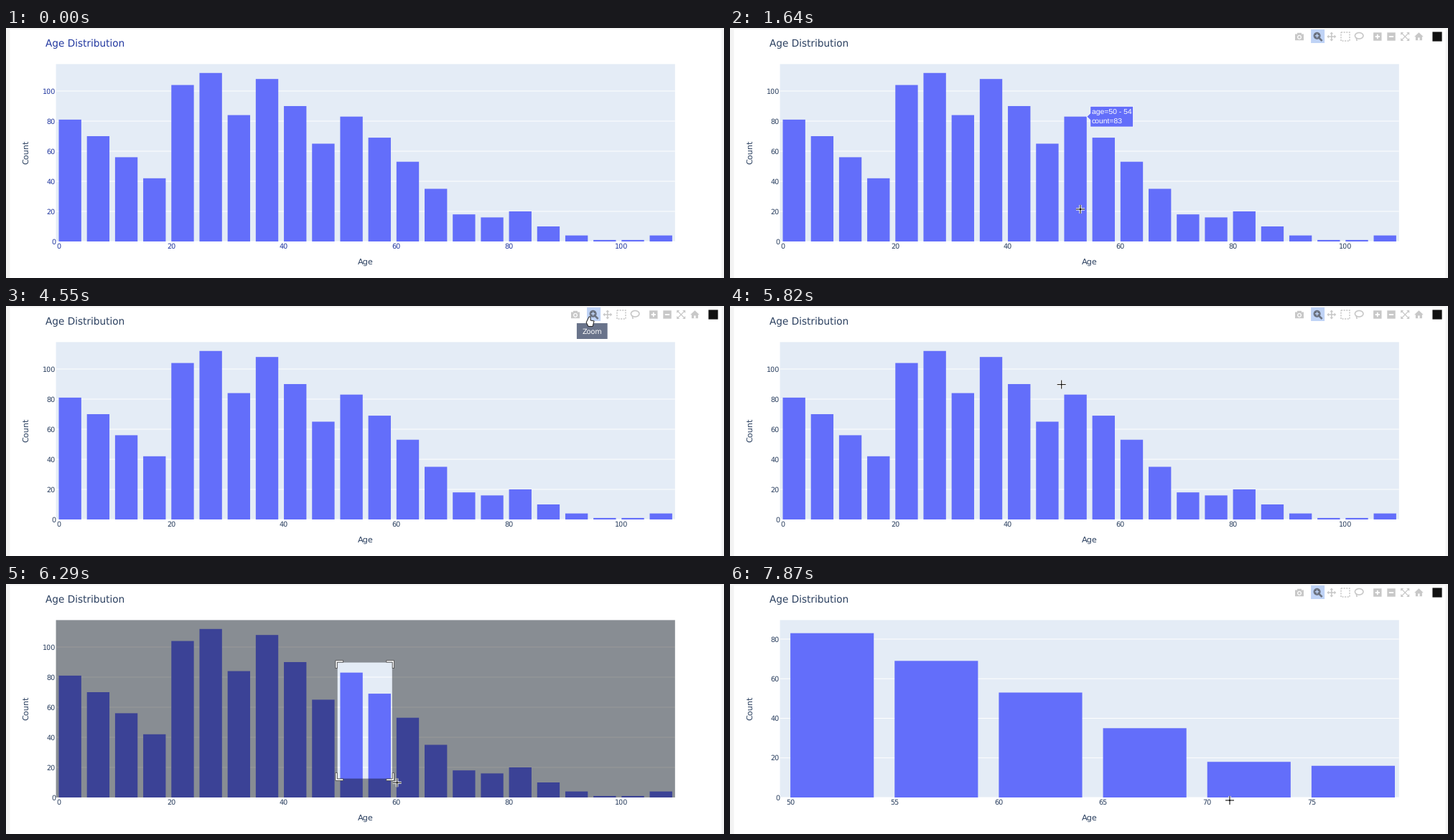
These frames come from a looping animation (1000x349 px, 8000 ms). A matplotlib script:

```python
import numpy as np
import matplotlib.pyplot as plt
from matplotlib.animation import FuncAnimation
from matplotlib.lines import Line2D
from matplotlib.patches import Circle, Ellipse, PathPatch, Polygon, Rectangle
from matplotlib.path import Path

W, H, DPI = 1000, 349, 100
LOOP, STEP = 8000, 40
LEFT, RIGHT, TOP, BOTTOM = 69.6, 931.8, 50.4, 298
COUNTS = [81, 70, 56, 42, 104, 112, 84, 108, 90, 65, 83,
          69, 53, 35, 18, 16, 20, 10, 4, 1, 1, 4]
FULL = (-0.5, 109.5, max(COUNTS) / 0.95)     # x from, x to, y top
ZOOM = (49.5, 79.2, 89.6)
BAR, PAPER, INK, FIRST_INK = "#636efa", "#e4ecf6", "#2a3f5f", "#2238a0"
GREY, ACTIVE, GLOW = "#c8c8c8", "#6b7280", "#bfd3f6"
START, END = np.array([461.7, 109.6]), np.array([696, 302])
SHOW, DRAG, DROP, RELEASE = 180, 5900, 7030, 7350

plt.rcParams["font.family"] = "DejaVu Sans"
plt.rcParams["text.hinting"] = "none"
plt.rcParams["path.snap"] = False
fig = plt.figure(figsize=(W / DPI, H / DPI), dpi=DPI, facecolor="#f3f3f3")
ax = fig.add_axes([0, 0, 1, 1])
ax.set(xlim=(0, W), ylim=(H, 0))
ax.axis("off")


def pt(px):
    return px * 72 / DPI


def put(artist, z):
    artist.set_zorder(z)
    ax.add_artist(artist)
    return artist


def box(x0, y0, x1, y1, color, z):
    return put(Rectangle((x0, y0), x1 - x0, y1 - y0, fc=color, ec="none"), z)


def square(cx, cy, half, color, z):
    return box(cx - half, cy - half, cx + half, cy + half, color, z)


def line(xs, ys, color, width, z, **kw):
    return put(Line2D(xs, ys, color=color, lw=pt(width),
                      solid_capstyle="butt", **kw), z)


def plus(cx, cy, r, color, width, z):
    return line([cx - r, cx + r, np.nan, cx, cx], [cy, cy, np.nan, cy - r, cy + r],
                color, width, z)


def shape(points, color, z, edge="none", width=0):
    return put(Polygon(points, closed=True, fc=color, ec=edge, lw=pt(width)), z)


def label(x, y, s, size, color=INK, z=6, **kw):
    return ax.text(x, y, s, fontsize=pt(size), color=color, zorder=z, **kw)


def show(parts, on):
    for p in parts:
        p.set_visible(bool(on))


# ---- chart -------------------------------------------------------------
def to_px(view, x, y):
    lo, hi, top = view
    return (LEFT + (x - lo) / (hi - lo) * (RIGHT - LEFT),
            BOTTOM - y / top * (BOTTOM - TOP))


def make_view(view, xticks, yticks):
    parts, ticks = [], []
    for v in yticks:
        y = to_px(view, 0, v)[1]
        parts.append(line([LEFT, RIGHT], [y, y], "white", 1, 2))
        ticks.append(label(69, y + 3.5, str(v), 9.6, ha="right"))
    for v in xticks:
        ticks.append(label(to_px(view, v, 0)[0], 308, str(v), 9.6, ha="center"))
    for k, n in enumerate(COUNTS):
        if view[0] < 5 * k and 5 * k + 4 < view[1]:
            parts.append(box(*to_px(view, 5 * k, n), *to_px(view, 5 * k + 4, 0), BAR, 3))
    return parts + ticks, ticks


box(5.5, 2, 996.5, H, "white", 0)
box(LEFT, TOP, RIGHT, BOTTOM, PAPER, 1)
full, full_ticks = make_view(FULL, range(0, 101, 20), range(0, 101, 20))
zoomed, _ = make_view(ZOOM, range(50, 76, 5), range(0, 81, 20))
title = label(55, 26, "Age Distribution", 13.6)
label(501, 330, "Age", 11.2, ha="center")
label(28, 173.5, "Count", 11.2, ha="center", va="center", rotation=90)


# ---- toolbar -------------------------------------------------------------
CY = 12


def button_x(slot, group):
    return 793 + 19.2 * slot + 6.4 * group


CAMERA, BADGE = button_x(0, 0), button_x(9, 3)
LOUPE, PAN, SELECT, LASSO = (button_x(k, 1) for k in range(1, 5))
PLUS, MINUS, FIT, HOME = (button_x(k, 2) for k in range(5, 9))


def pan_icon(color, z):
    parts = [plus(PAN, CY, 5, color, 1.5, z)]
    for a in np.arange(4) * np.pi / 2:
        u = np.array([np.cos(a), np.sin(a)])
        v = np.array([-u[1], u[0]])
        c = u * 3.7 + (PAN, CY)
        parts.append(shape([c + 2.8 * u, c + 2.5 * v, c - 2.5 * v], color, z))
    return parts


def make_toolbar():
    parts = [
        box(CAMERA - 6, 8.5, CAMERA + 6, 17.2, GREY, 7),
        box(CAMERA - 3, 6.8, CAMERA + 3, 9, GREY, 7),
        put(Circle((CAMERA, 12.8), 3, fc="white"), 8),
        put(Circle((CAMERA, 12.8), 1.7, fc=GREY), 9),
        square(LOUPE, 11.5, 9.5, GLOW, 7),
        line([LOUPE, LOUPE + 6], [12, 18], ACTIVE, 2.6, 8),
        put(Circle((LOUPE - 1, 10.8), 5, fc=ACTIVE), 8),
        plus(LOUPE - 1, 10.8, 2.7, GLOW, 1.3, 9),
        put(Rectangle((SELECT - 6, CY - 6), 12, 12, fc="none", ec=GREY,
                      lw=pt(1.5), ls=(0, (1.4, 1))), 8),
        put(Ellipse((LASSO, 10.8), 11.5, 8.5, fc="none", ec=GREY, lw=pt(1.6)), 8),
        line([LASSO - 4, LASSO - 3], [13.5, 18], GREY, 1.6, 8),
        square(PLUS, CY, 5.7, GREY, 8), plus(PLUS, CY, 3.2, "white", 1.8, 9),
        square(MINUS, CY, 5.7, GREY, 8),
        line([MINUS - 3.2, MINUS + 3.2], [CY, CY], "white", 1.8, 9),
        shape([(HOME, 6.2), (HOME + 6.3, 12.2), (HOME - 6.3, 12.2)], GREY, 8),
        box(HOME - 4.5, 11.5, HOME + 4.5, 17.2, GREY, 8),
        box(HOME - 1.2, 13.4, HOME + 1.2, 17.2, "white", 9),
        square(BADGE, CY, 6.6, "#111111", 8),
    ]
    for sx in (-1, 1):
        for sy in (-1, 1):
            c, d = np.array([FIT, CY]), np.array([sx, sy])
            parts.append(line(*zip(c, c + 5 * d), GREY, 1.2, 8))
            parts.append(shape([c + 6 * d, c + d * (2, 6), c + d * (6, 2)], GREY, 8))
    return parts + pan_icon(GREY, 8)


toolbar = make_toolbar()
pan_dark = pan_icon("#777777", 9)
tip_text = label(0, 38.5, "", 9.6, "white", 15, ha="center")
tip_box = box(0, 24, 1, 46, "#69738a", 14)
tip = [tip_text, tip_box]

# ---- hover label, selection and pointers -----------------------------------
hover_box = shape([(0, 0)] * 3, BAR, 12, "white", 0.8)
hover_rows = [label(0, 0, "", 10.4, "white", 13, family="Liberation Sans")
              for _ in range(2)]
hover = [hover_box, *hover_rows]

shade = put(PathPatch(Path([(0, 0)]), fc="black", ec="none"), 10)
handles = put(PathPatch(Path([(0, 0)]), fc="white", ec="#444444", lw=pt(0.8)), 11)

cross = [line([], [], "white", 3.2, 19), line([], [], "#111111", 1.1, 20)]
HAND = np.array([(-1, 0), (1, 0), (1, 5), (6, 6), (4, 13.5), (-2, 13.5), (-5, 8)])
ARROW = np.array([(0, 0), (0, 12), (8.4, 8.6)])
hand = shape(HAND, "white", 20, "#222222", 1)
arrow = shape(ARROW, "#111111", 20, "white", 0.8)

# leave, arrive, place
MOVES = [(SHOW, 930, (285, 225)), (1060, 1640, (488, 253)),
         (2210, 2700, (PAN - 1.5, 13.5)), (3270, 3580, (LOUPE, 13.5)),
         (4440, 5800, START)]


def pointer(t):
    if t > DRAG:
        # sideways evenly, downwards fast at first
        s = min((t - DRAG) / (DROP - DRAG), 1)
        return START + (END - START) * (s, 1 - (1 - s) ** 4.7)
    pos = np.array([120, H])
    for leave, arrive, place in MOVES:
        s = np.clip((t - leave) / (arrive - leave), 0, 1)
        pos = pos + (np.array(place) - pos) * s * s * (3 - 2 * s)
    return pos


def rect(x0, y0, x1, y1):
    return [(x0, y0), (x1, y0), (x1, y1), (x0, y1)]


def joined(polys):
    return Path.make_compound_path(*[Path([*p, p[0]], closed=True) for p in polys])


def corner(cx, cy, sx, sy, near=0.4, far=2.8, arm=8):
    ell = [(far, -arm), (near, -arm), (near, near), (-arm, near), (-arm, far), (far, far)]
    return [(cx + sx * u, cy + sy * v) for u, v in ell]


def set_selection(t):
    on = DRAG < t < RELEASE
    show([shade, handles], on)
    if not on:
        return
    x0, y0 = START
    x1, y1 = np.clip(pointer(t - 33), START, (RIGHT, BOTTOM))
    if x1 - x0 < min(max(0.6 * (y1 - y0), 8), 16):
        marks = [rect(x0 - 16, y + s * 0.4, x0 + 16, y + s * 2.8)
                 for y, s in ((y0, -1), (y1, 1))]
        x0, x1 = LEFT, RIGHT
    else:
        marks = [corner(x, y, sx, sy) for x, sx in ((x0, -1), (x1, 1))
                 for y, sy in ((y0, -1), (y1, 1))]
    handles.set_path(joined(marks))
    shade.set_path(joined([rect(LEFT, TOP, RIGHT, BOTTOM),
                           rect(x0, y0, x1, y1)[::-1]]))
    shade.set_alpha(np.interp(t, [DRAG, DRAG + 70], [0, 0.4]))


def set_hover(x, y):
    age = FULL[0] + (x - LEFT) / (RIGHT - LEFT) * (FULL[1] - FULL[0])
    k = int(np.clip(age // 5, 0, len(COUNTS) - 1))
    tx, ty = to_px(FULL, 5 * k + 4, COUNTS[k])
    on = 0 <= age - 5 * k <= 4 and ty <= y < BOTTOM
    show(hover, on)
    if not on:
        return
    for row, s, dy in zip(hover_rows, (f"age={5 * k} - {5 * k + 4}",
                                       f"count={COUNTS[k]}"), (-2.8, 10.2)):
        row.set_text(s)
        row.set_position((tx + 7, ty + dy))
    end = max(row.get_window_extent().x1 for row in hover_rows) + 2.2
    hover_box.set_xy([(tx, ty), (tx + 5, ty - 4.8),
                      *rect(tx + 5, ty - 14.4, end, ty + 14.4), (tx + 5, ty + 4.8)])


def set_tip(name, cx):
    show(tip, name)
    show(pan_dark, name == "Pan")
    if name:
        tip_text.set_text(name)
        tip_text.set_x(cx)
        w = tip_text.get_window_extent().width + 15
        tip_box.set_bounds(cx - w / 2, 24, w, 22)


def update(i):
    t = (i + 0.5) * STEP
    x, y = pointer(t)
    show(full, t < RELEASE)
    show(zoomed, t >= RELEASE)
    for s in [title, *full_ticks]:
        s.set_color(FIRST_INK if t < SHOW else INK)
    fade = np.interp(t, [SHOW, SHOW + 300, DRAG - 40, DRAG + 150, RELEASE, RELEASE + 250],
                     [0, 1, 1, 0, 0, 1])
    for p in toolbar:
        p.set_alpha(fade)

    name, cx = "Pan" if x > (LOUPE + PAN) / 2 else "Zoom", 0
    cx = (PAN if name == "Pan" else LOUPE) - 2.3
    if y > 21 or abs(x - cx - 2.3) > 9.6:
        name = None
    set_tip(name, cx)
    set_hover(x, y) if t < DRAG else show(hover, False)
    set_selection(t)

    inside = t > DRAG or (LEFT <= x <= RIGHT and TOP <= y <= BOTTOM)
    show(cross, inside)
    show([hand], name)
    show([arrow], t > SHOW and not inside and not name)
    for c in cross:
        c.set_data([x - 6, x + 6, np.nan, x, x], [y, y, np.nan, y - 6, y + 6])
    hand.set_xy(HAND + (x, y))
    arrow.set_xy(ARROW + (x, y))
    return []


anim = FuncAnimation(fig, update, frames=LOOP // STEP, interval=STEP,
                     init_func=lambda: [], repeat=True, repeat_delay=0,
                     cache_frame_data=False)
plt.show()
```
